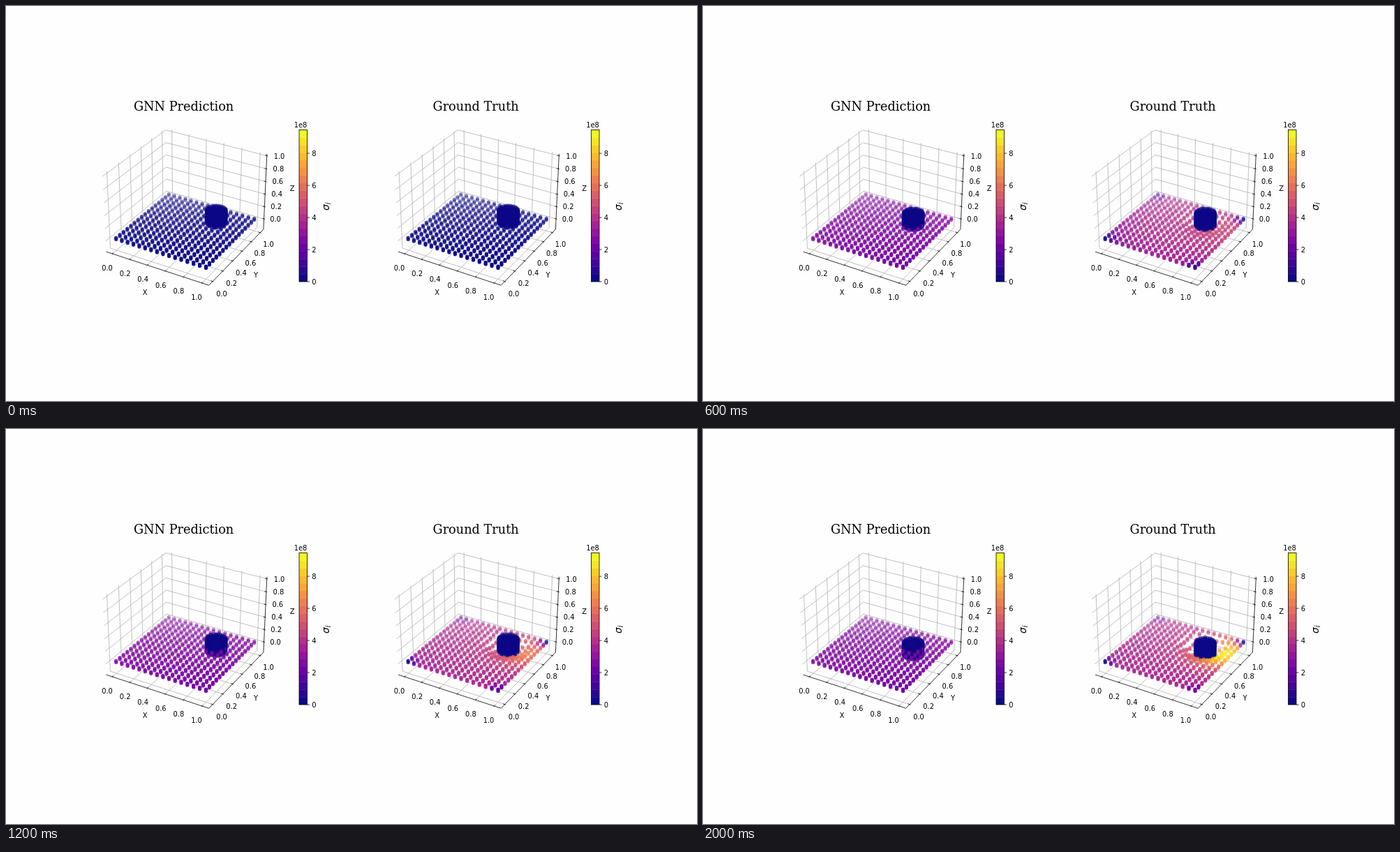
These frames come from a looping animation (990 by 566 pixels, 2200 ms). An HTML page with a canvas:

```html
<!DOCTYPE html>
<html lang="en">
<head>
<meta charset="utf-8">
<title>Stress comparison</title>
<style>
  html, body { margin: 0; width: 100%; height: 100%; overflow: hidden; background: #fefefe; }
  svg, canvas { position: absolute; left: 0; top: 0; width: 990px; height: 566px; }
  text { font: 9.85px "DejaVu Sans", sans-serif; text-anchor: middle; }
  .title { font: 17.7px "DejaVu Serif", "Noto Serif", serif; }
  .sigma { font: italic 13.8px "DejaVu Sans", sans-serif; text-anchor: start; }
  .sub { font-size: 9.7px; }
  .start { text-anchor: start; }
  .grid { fill: none; stroke: #b0b0b0; stroke-width: .8; }
  .axis { fill: none; stroke: #000; stroke-width: .8; }
</style>
</head>
<body>
<svg id="chart" viewBox="0 0 990 566"></svg>
<canvas id="dots" width="990" height="566"></canvas>
<script>
const LOOP = 2200, STEP = 200, PANEL_GAP = 418.5, MAX_STRESS = 9.46;
const TICKS = [0, .2, .4, .6, .8, 1];
const LO = -.073, HI = 1.073, Z_LO = -.172, Z_HI = 1.03;
const mix = (a, b, t) => a + (b - a) * t;
const clamp = (v, lo = 0, hi = 1) => Math.min(hi, Math.max(lo, v));

// Perspective camera at 30° elevation and -60° azimuth.
function project(x, y, z) {
  const X = (x - .5) * 1.039, Y = (y - .5) * 1.039;
  const Z = (z - (Z_LO + Z_HI) / 2) * .893 / (Z_HI - Z_LO);
  const near = .433 * X - .75 * Y + .5 * Z;
  const scale = 1416 / (10 - near);
  return {
    x: 258.3 + scale * (.866 * X + .5 * Y),
    y: 282.2 - scale * (-.25 * X + .433 * Y + .866 * Z),
    near
  };
}

const PLASMA = ['0d0887', '46039f', '7201a8', '9c179e', 'bd3786',
                'd8576b', 'ed7953', 'fb9f3a', 'fdca26', 'f0f921']
  .map(hex => [0, 2, 4].map(i => parseInt(hex.slice(i, i + 2), 16)));

function plasma(t) {
  const pos = clamp(t) * 9, i = Math.min(8, Math.floor(pos));
  return `rgb(${PLASMA[i].map((c, n) => Math.round(mix(c, PLASMA[i + 1][n], pos - i)))})`;
}

// Static chart
function chartPanel(title) {
  const parts = [];
  const line = (cls, ...pts) => parts.push(`<polyline class="${cls}" points="${pts.map(p => {
    const q = project(...p);
    return q.x.toFixed(2) + ',' + q.y.toFixed(2);
  }).join(' ')}"/>`);
  const text = (x, y, str, cls = '') =>
    parts.push(`<text x="${x}" y="${y}" class="${cls}">${str}</text>`);
  const labels = (x0, y0, x1, y1, bend = 0) => TICKS.forEach(t => {
    const b = bend * 4 * t * (1 - t);
    text(mix(x0, x1, t) + b, mix(y0, y1, t) - b + 3.6, t.toFixed(1));
  });

  for (const t of TICKS) {
    line('grid', [t, LO, Z_LO], [t, HI, Z_LO], [t, HI, Z_HI]);
    line('grid', [HI, t, Z_LO], [LO, t, Z_LO], [LO, t, Z_HI]);
    line('grid', [LO, LO, t], [LO, HI, t], [HI, HI, t]);
  }
  line('axis', [LO, LO, Z_LO], [HI, LO, Z_LO], [HI, HI, Z_LO], [HI, HI, Z_HI]);
  for (const t of TICKS) {
    line('axis', [t, LO - .01, Z_LO], [t, LO + .019, Z_LO]);
    line('axis', [HI + .01, t, Z_LO], [HI - .019, t, Z_LO]);
    line('axis', [HI + .01, HI, t], [HI - .019, HI, t]);
  }
  labels(145, 375, 273, 417);
  labels(309, 412, 376, 341, 1.2);
  labels(386, 305, 391.5, 215);
  text(199, 413.6, 'X');
  text(358, 388.6, 'Y');
  text(410, 264.6, 'Z');
  text(254.6, 150, title, 'title');

  const top = 177.5, bottom = 395, left = 420, width = 11.5, bands = 20;
  const bandHeight = (bottom - top) / bands;
  for (let i = 0; i < bands; i++) {
    parts.push(`<rect x="${left}" y="${bottom - (i + 1) * bandHeight}" width="${width}"
      height="${bandHeight + (i ? .4 : 0)}" fill="${plasma(i / (bands - 1))}"/>`);
  }
  parts.push(`<rect class="axis" x="${left}" y="${top}" width="${width}" height="${bottom - top}"/>`);
  for (let v = 0; v < 10; v += 2) {
    const y = bottom - v * (bottom - top) / MAX_STRESS;
    parts.push(`<path class="axis" d="M${left + width} ${y}h3.5"/>`);
    text(438.3, y + 3.7, v, 'start');
  }
  text(422, 174, '1e8');
  parts.push(`<text class="sigma" transform="translate(463 293) rotate(-90)">σ<tspan
    class="sub" dy="2">i</tspan></text>`);
  return parts.join('');
}

document.getElementById('chart').innerHTML =
  `<g>${chartPanel('GNN Prediction')}</g>
   <g transform="translate(${PANEL_GAP} 0)">${chartPanel('Ground Truth')}</g>`;

// Moving points
const PUNCH = { x: .7, y: .75, r: .097, h: .195 };
const HOT_SPOT = { x: .9, y: .72, r: .28 };
const PLATE_LAYERS = [.004, .028], PLATE_TOP = .028, SIDE = 16;
const distance = (x, y, p) => Math.hypot(x - p.x, y - p.y);
const punchBottom = k => .02 - .015 * k;

function ring(r, count, z) {
  return Array.from({ length: count }, (_, i) => {
    const a = 2 * Math.PI * i / count;
    return { x: PUNCH.x + r * Math.cos(a), y: PUNCH.y + r * Math.sin(a), z, stress: 0 };
  });
}

function punchPoints(k) {
  const z0 = punchBottom(k), points = [];
  for (let i = 0; i <= 8; i++) points.push(...ring(PUNCH.r, 24, z0 + PUNCH.h * i / 8));
  for (const z of [z0, z0 + PUNCH.h])
    points.push(...ring(.066, 16, z), ...ring(.033, 8, z), ...ring(0, 1, z));
  return points;
}

const predictedStress = (x, y) => 2.6 - .4 * x * (1 - y);

function trueStress(x, y, k) {
  const reach = .62 + .42 * Math.log(k);
  const spread = 3.95 / (1 + Math.exp((distance(x, y, PUNCH) - reach) / (.12 + .02 * k)));
  const growth = .38 * (k - 1) + .025 * (k - 1) ** 2;
  const peak = growth * Math.exp(-((distance(x, y, HOT_SPOT) / HOT_SPOT.r) ** 2));
  const size = .1 + .12 / k, floor = Math.min(.65, .08 * k);
  const fixed = Math.min(Math.hypot(x, y), Math.hypot(1 - x, 1 - y)) / size;
  const loose = Math.max(floor, Math.min(Math.hypot(1 - x, y), Math.hypot(x, 1 - y)) / size);
  return (spread + peak) * clamp(fixed) * clamp(loose);
}

function sag(x, y, k) {
  const gap = Math.max(0, distance(x, y, PUNCH) - PUNCH.r);
  const edge = clamp(Math.min(x, y, 1 - x, 1 - y) / .1);
  return Math.max(0, PLATE_TOP - punchBottom(k)) * Math.exp(-((gap / .11) ** 2)) * edge;
}

function platePoints(k, isTruth) {
  const points = [];
  for (let i = 0; i < SIDE; i++) for (let j = 0; j < SIDE; j++) {
    const x = i / (SIDE - 1), y = j / (SIDE - 1);
    const stress = !k ? 0 : isTruth ? trueStress(x, y, k) : predictedStress(x, y);
    const drop = k && isTruth ? sag(x, y, k) : 0;
    for (const z of PLATE_LAYERS) points.push({ x, y, z: z - drop, stress });
  }
  return points;
}

const ctx = document.getElementById('dots').getContext('2d');

function drawPoints(points, offset) {
  const dots = points.map(p => ({ ...project(p.x, p.y, p.z), stress: p.stress }))
    .sort((a, b) => a.near - b.near);
  const far = dots[0].near, range = dots[dots.length - 1].near - far;
  ctx.lineWidth = 1.5;
  for (const dot of dots) {
    ctx.globalAlpha = .3 + .7 * (dot.near - far) / range;
    ctx.fillStyle = ctx.strokeStyle = plasma(dot.stress / MAX_STRESS);
    ctx.beginPath();
    ctx.arc(dot.x + offset, dot.y, 1.95, 0, 2 * Math.PI);
    ctx.fill();
    ctx.stroke();
  }
}

let shown = -1;
function render() {
  const k = Math.floor(performance.now() % LOOP / STEP);
  if (k !== shown) {
    shown = k;
    ctx.clearRect(0, 0, 990, 566);
    [false, true].forEach((isTruth, panel) =>
      drawPoints([...platePoints(k, isTruth), ...punchPoints(k)], panel * PANEL_GAP));
  }
  requestAnimationFrame(render);
}
render();
</script>
</body>
</html>
```
